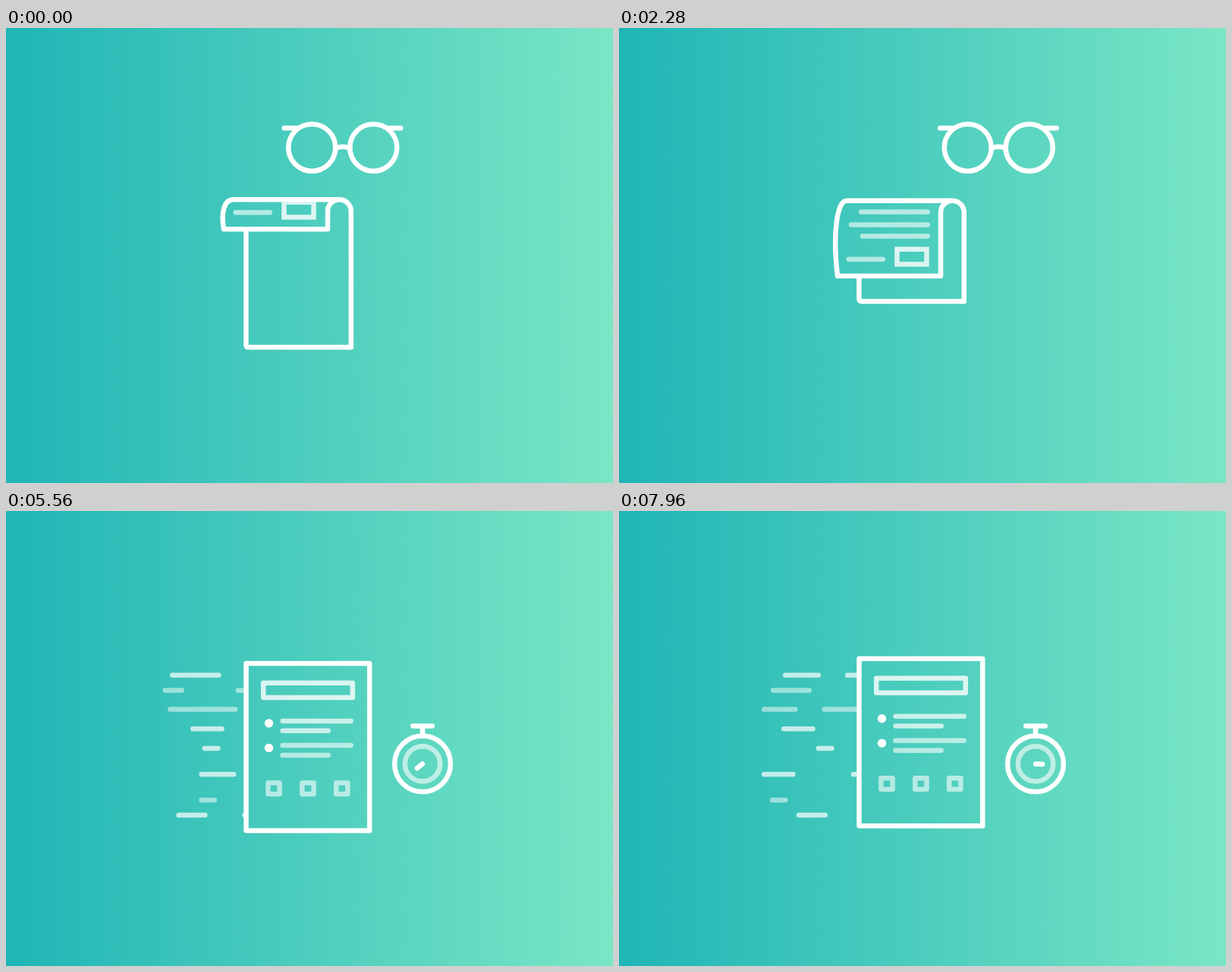
These frames come from a looping animation (800x600 px, 8000 ms). An HTML page:

```html
<!DOCTYPE html>
<html lang="en">
<head>
<meta charset="utf-8">
<title>Paper to screen</title>
<style>
  html, body { margin: 0; width: 100%; height: 100%; overflow: hidden; }
  svg {
    display: block; width: 100vw; height: 100vh;
    background: linear-gradient(90deg, #1fb5b6, #7ae6c5);
    fill: none; stroke: #fff; stroke-width: 6.5;
    stroke-linecap: round; stroke-linejoin: round;
  }
</style>
</head>
<body>
<svg viewBox="0 0 800 600">
  <clipPath id="under"><rect id="underRect" x="270" width="200" height="300"/></clipPath>
  <clipPath id="trail"><rect x="150" y="150" width="167" height="300"/></clipPath>
  <g id="paper"><g id="print" clip-path="url(#under)"></g></g>
  <g id="glasses"></g>
  <g id="dashes" clip-path="url(#trail)"></g>
  <g id="doc"></g>
  <g id="watch"></g>
</svg>
<script>
const LOOP = 8000;
const $ = id => document.getElementById(id);
const clamp = v => Math.min(1, Math.max(0, v));
const mix = (a, b, k) => a + (b - a) * k;
const mod = (a, n) => ((a % n) + n) % n;
const quad = p => p < .5 ? 2 * p * p : 1 - 2 * (1 - p) ** 2;
const cubic = p => p < .5 ? 4 * p ** 3 : 1 - 4 * (1 - p) ** 3;
const span = (t, start, length, ease = quad) => ease(clamp((t - start) / length));

function add(parent, d, opacity = 1) {
  const el = document.createElementNS('http://www.w3.org/2000/svg', 'path');
  el.setAttribute('d', d);
  el.setAttribute('pathLength', 1);
  el.setAttribute('opacity', opacity);
  return $(parent).appendChild(el);
}
const show = (el, on) => { el.style.display = on ? '' : 'none'; };
const move = (el, x, y) => el.setAttribute('transform', `translate(${x} ${y})`);

// Shows only the part of a path between the fractions a and b.
function trim(el, a, b) {
  show(el, b - a > .004);
  const whole = a <= 0 && b >= 1;
  el.setAttribute('stroke-dasharray', whole ? 'none' : `${b - a} 3`);
  el.setAttribute('stroke-dashoffset', whole ? 0 : -a);
}

const circle = (x, y, r) => `M${x} ${y - r}a${r} ${r} 0 0 1 0 ${2 * r}a${r} ${r} 0 0 1 0 ${-2 * r}`;
const box = (x0, y0, x1, y1) => `M${x1 - 2} ${y1}H${x0}V${y0}H${x1}V${y1}Z`;

// Newspaper
const sheet = add('paper', 'M0 0');
// path relative to the flap's lower edge, opacity, draw start, erase start
const print = [
  ['M319 -84.5H406.7', .6, 1350, 3372],
  ['M306 -67.5H406.7', .6, 1050, 3331],
  ['M321 -52.5H406.7', .6, 950, 3200],
  ['M302.7 -22H347.8', .6, -400, 3442],
  ['M405.5 -15.6V-35.4H366.5V-15.6Z', .8, -400, 3414],
].map(([d, opacity, from, to]) => ({ el: add('print', d, opacity), from, to }));
print[4].el.setAttribute('stroke-linejoin', 'miter');

function drawPaper(t) {
  show($('paper'), t < 4040);
  const roll = span(t, 0, 2200, cubic);
  const beat = Math.min(1, Math.abs(mod(t, 800) - 360) / 280);
  const top = mix(226.2, 227.8, roll) - 8.4 * Math.cos(beat * Math.PI / 2) ** 2;
  const flap = top + mix(39, 99.3, roll);
  const foot = top + mix(194.8, 132.6, roll);
  const bulge = top + (flap - top) * .4;
  sheet.setAttribute('d',
    `M440 ${top}H300C288 ${top} ${mix(283, 281, roll)} ${bulge} ${mix(287, 288, roll)} ${flap}` +
    `H424V${top + 15.4}a15.4 15.4 0 0 1 30.8 0V${foot}H320q-3.6 0 -3.6 -3.6V${flap + 3}`);
  trim(sheet, span(t, 3360, 680), 1);
  $('underRect').setAttribute('y', top + 3);
  for (const { el, from, to } of print) {
    move(el, 0, flap);
    trim(el, span(t, to, 320), span(t, from, 300));
  }
}

// Glasses, relative to the centre of the left lens
const glasses = [
  ['M-19 -25.8H-36.5', 3520, 120],
  ['M100 -25.8H117', 3520, 120],
  [circle(0, 0, 31), 3620, 400],
  [circle(81, 0, 31), 3640, 400],
  ['M31 1Q40.5 -3.6 50 1', 3600, 240],
].map(([d, from, length]) => ({ el: add('glasses', d), from, length }));

function drawGlasses(t) {
  const beat = mod(t - 150, 800);
  const sweep = span(beat, 0, 300) - span(beat, 400, 300);
  move($('glasses'), mix(397.7, 497, sweep), 157.7);
  for (const { el, from, length } of glasses) trim(el, span(t, from, length), 1);
}

// Web document
const tile = n => box(345.4 + 44.9 * n, 352, 360.6 + 44.9 * n, 366.8);
const docParts = [
  [box(316.5, 194.7, 479.2, 415), 1, 4200, 500],
  ['M339.2 237.5V220.3H456.8V239.7H339.2Z', .8, 4360, 400],
  ['M364.6 270.6H454.7', .7, 4190, 320],
  ['M364.6 283.4H424.7', .7, 4282, 320],
  ['M364.6 302.6H454.7', .6, 4368, 320],
  ['M364.6 315.5H424.7', .6, 4405, 320],
  [tile(0), .6, 4325, 320],
  [tile(1), .6, 4440, 320],
  [tile(2), .6, 4555, 320],
].map(([d, opacity, from, length]) => ({ el: add('doc', d, opacity), from, length }));
const dots = [273.6, 306].map(y => add('doc', `M346.5 ${y}h.01`));

function drawDoc(t) {
  show($('doc'), t >= 4200);
  const swing = t > 5000 ? Math.sin((t - 5000) / 560 * 2 * Math.PI) : 0;
  move($('doc'), 0, 6.4 * (1 - swing));
  for (const { el, from, length } of docParts) trim(el, 0, span(t, from, length));
  dots.forEach((el, i) => el.setAttribute('stroke-width', 11.4 * span(t, 4200 + 80 * i, 200)));
}

// Stopwatch
const rim = add('watch', circle(549, 333.4, 36.9));
const dial = add('watch', circle(549, 333.4, 23.2), .6);
const stem = add('watch', 'M549 295V284');
const knob = add('watch', 'M536.3 283.4H561.7');
const hand = add('watch', 'M549 333.2V324.2');

function drawWatch(t) {
  show($('watch'), t >= 4200);
  trim(rim, 0, span(t, 4232, 500));
  trim(dial, 0, span(t, 4324, 400));
  trim(stem, 0, span(t, 4200, 160));
  trim(knob, 0, span(t, 4240, 240));
  trim(hand, 0, span(t, 4340, 160));
  const press = 4 * (span(t, 5000, 120) - span(t, 5120, 160));
  move(knob, 0, press);
  move(stem, 0, press);
  const turn = t < 6240 ? 512 * clamp((t - 5000) / 1240) : 512 + 661 * (t - 6240) / 1720;
  hand.setAttribute('transform', `rotate(${turn} 549 333.4)`);
}

// Speed lines: y, opacity, left limit, dash, period, dash position, travel
const rows = [
  [216.6, .7, 216, 92, 124, 170, 368],
  [236.5, .5, 188, 54, 122, 170, 336],
  [261.5, .5, 188, 92, 124, 212, 316.5],
  [287.2, .7, 188, 44.7, 100, 221.5, 307.5],
  [312.9, .7, 188, 24, 110, 244.3, 314.5],
  [347.3, .7, 188, 49, 122, 252.7, 313],
  [381.2, .5, 188, 23.7, 128, 257.8, 315],
  [400.9, .7, 223.4, 41.3, 87, 277.7, 305],
].map(row => ({ row, el: add('dashes', 'M0 0', row[1]) }));
rows.forEach(({ el }) => el.removeAttribute('pathLength'));

function drawDashes(t) {
  show($('dashes'), t > 5000);
  for (const { row, el } of rows) {
    const [y, , left, dash, period, at, travel] = row;
    const speed = travel / 1720;
    const limit = Math.max(left, 316 - (t - 5000) * speed);
    const first = mod(at - speed * (t - 6240), period) - period;
    let d = '';
    for (let x = first; x < 320; x += period) {
      const a = Math.max(x, limit) + 3.2;
      const b = Math.min(x + dash, 330) - 3.2;
      if (b > limit + 3.2 && a < 320) d += `M${a} ${y}H${Math.max(b, a + .01)}`;
    }
    show(el, d);
    el.setAttribute('d', d || 'M0 0');
  }
}

let begin;
function frame(now) {
  begin ??= now;
  const t = (now - begin) % LOOP;
  for (const draw of [drawPaper, drawGlasses, drawDoc, drawWatch, drawDashes]) draw(t);
  requestAnimationFrame(frame);
}
requestAnimationFrame(frame);
</script>
</body>
</html>
```
